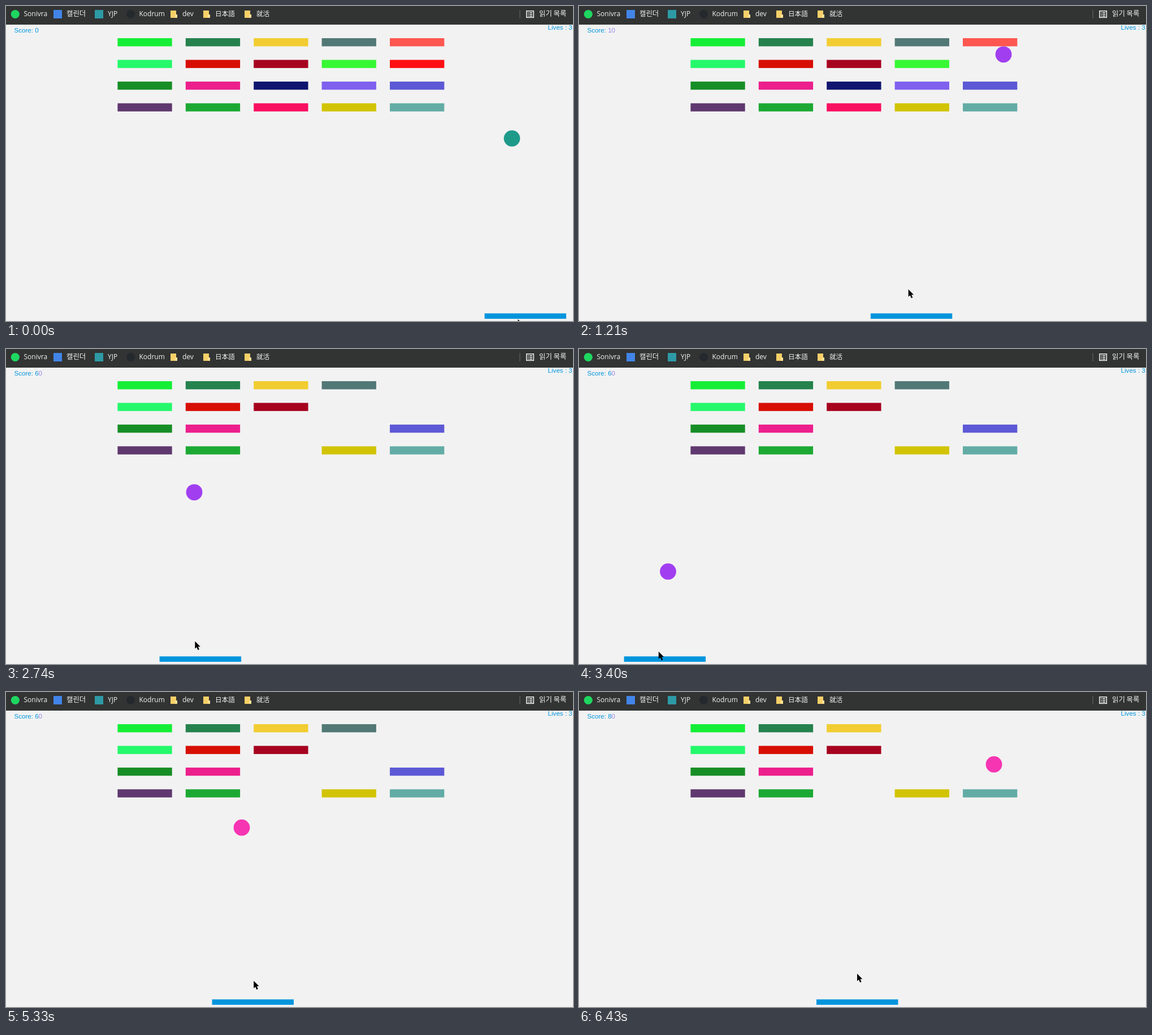
An HTML page with a canvas that plays this animation: 1003 by 558 pixels, repeating every 6.46 s.

```html
<!DOCTYPE html>
<html lang="en">
<head>
<meta charset="utf-8">
<title>Brick breaker</title>
<style>
  html, body { margin: 0; width: 100%; height: 100%; overflow: hidden; background: #f2f2f2; }
  canvas { display: block; }
</style>
</head>
<body>
<canvas id="stage" width="1003" height="558"></canvas>
<script>
const ctx = document.getElementById('stage').getContext('2d');
const LOOP = 6460;
const RADIUS = 14.4;
const BLUE = '#0095dd';
const LILAC = '#9a86e6';
const WHITE = '#f4f4f4';
const ballColors = ['#1e9a8a', '#a13ff0', '#f635b3'];

const bricks = `
  15ee36 25824d f1cd31 527876 fe5750
  25f86b d70e03 a6031f 37f834 ff0f14
  178e25 ec1f8c 10166f 7f60ef 5d59d6
  5f386f 1ca933 f90f60 d2c405 63aca6`.trim().split(/\s+/).map((color, i) => ({
    x: 197.4 + 120.4 * (i % 5),
    y: 57 + 38.45 * Math.floor(i / 5),
    w: 96.3, h: 14.4,
    color: '#' + color,
    hitAt: Infinity
  }));

// pace of the game: [time, simulation step]
const pace = [[0, 0], [1210, 658], [2060, 1134], [3400, 1845], [4400, 2377], [5330, 2936], [6430, 3571]];

// player: [time, paddle x, cursor y]
const player = [
  [0, 847, 555], [650, 582, 510], [1210, 516, 502], [2060, 379, 495],
  [2640, 301, 515], [3400, 80, 536], [3600, 12, 537], [4100, 12, 537],
  [4400, 109, 528], [4610, 212, 522], [5300, 363, 512], [6430, 420, 499]
];

function along(path, t) {
  const i = path.findIndex(p => p[0] > t);
  if (i < 0) return path[path.length - 1].slice(1);
  const a = path[i - 1], b = path[i];
  const k = (t - a[0]) / (b[0] - a[0]);
  return a.slice(1).map((v, j) => v + (b[j + 1] - v) * k);
}

// Play the whole game once; a brick counts as hit when the ball's centre is DEPTH inside.
function playGame(steps) {
  const DEPTH = 4;
  const states = [];
  let x = 894.5, y = 235, dx = 0.5, dy = -0.4, sideHits = 0;
  for (let n = 0; n <= steps; n++) {
    states.push({ x, y, color: ballColors[sideHits] });
    x += dx;
    y += dy;
    if (x >= 987.5 || x <= 14.5) {
      dx = -dx;
      sideHits++;
    }
    if (y <= 48 || y >= 535) dy = -dy;
    const hit = bricks.find(b => b.hitAt > n && x > b.x && x < b.x + b.w &&
      y > b.y + DEPTH && y < b.y + b.h - DEPTH);
    if (hit) {
      hit.hitAt = n + 1;
      dy = -dy;
    }
  }
  return states;
}
const states = playGame(pace[pace.length - 1][1]);

function rect(x, y, w, h, color) {
  ctx.fillStyle = color;
  ctx.fillRect(x, y, w, h);
}

function circle(x, y, r, color) {
  ctx.fillStyle = color;
  ctx.beginPath();
  ctx.arc(x, y, r, 0, 7);
  ctx.fill();
}

// Draws text and returns where it ends.
function text(s, x, y, font, color) {
  ctx.font = font;
  ctx.fillStyle = color;
  ctx.fillText(s, x, y);
  return x + ctx.measureText(s).width;
}

function folder(x) {
  rect(x, 8, 10, 13, '#f7d068');
  rect(x + 8, 15, 4, 6, '#ffe194');
}

function drawBookmarks() {
  const latin = '12px "Open Sans", sans-serif';
  const korean = '12.4px "Noto Sans CJK KR", sans-serif';
  const japanese = '11.6px "Noto Sans CJK JP", sans-serif';
  const label = (s, x, font) => text(s, x, 18.3, font, WHITE);
  rect(0, 0, 1003, 33, '#323333');
  circle(16.3, 14.5, 7.6, '#1ed760');
  rect(84, 7, 15, 15, '#4285e8');
  rect(157, 7, 15, 15, '#2d9aa5');
  circle(220.5, 14.5, 7.6, '#24292e');
  [291, 349, 422].forEach(folder);
  label('Sonivra', 31.5, latin);
  label('캘린더', 107, korean);
  label('YJP', 180, latin);
  label('Kodrum', 235.5, latin);
  label('dev', 312, latin);
  label('日本語', 370, japanese);
  label('就活', 443, japanese);
  label('읽기 목록', 943, korean);
  rect(908.5, 7, 1, 15, '#6a6b6b');
  ctx.strokeStyle = WHITE;
  ctx.lineWidth = 1.5;
  ctx.strokeRect(920.8, 8.8, 12.5, 11.5);
  for (const y of [11, 14, 17]) {
    rect(923, y, 1.6, 1.5, WHITE);
    rect(926, y, 5, 1.5, WHITE);
  }
}

function drawStatus(count) {
  const font = '11.6px "Liberation Sans", Arial, sans-serif';
  let x = text('Score: ', 14.4, 47, font, BLUE);
  if (count) x = text(count, x, 47, font, count === 1 ? LILAC : BLUE);
  text('0', x, 47, font, count ? LILAC : BLUE);
  text('Lives : 3', 958.6, 42.3, font, BLUE);
}

function drawCursor(x, y) {
  const shape = [[0, 0], [0, 13], [3, 10.5], [5.2, 15.5], [7.6, 14.4], [5.4, 9.6], [9.4, 9.4]];
  ctx.fillStyle = '#000';
  ctx.beginPath();
  shape.forEach(([dx, dy]) => ctx.lineTo(x + dx, y + dy));
  ctx.fill();
}

function frame(now) {
  const t = now % LOOP;
  const step = Math.round(along(pace, t)[0]);
  const ball = states[step];
  const [paddleX, cursorY] = along(player, t);
  const standing = bricks.filter(b => b.hitAt > step);

  rect(0, 0, 1003, 558, '#f2f2f2');
  standing.forEach(b => rect(b.x, b.y, b.w, b.h, b.color));
  drawStatus(bricks.length - standing.length);
  rect(paddleX, 544.5, 144.4, 9.6, BLUE);
  circle(ball.x, ball.y, RADIUS, ball.color);
  drawBookmarks();
  // the paddle trails the mouse slightly
  drawCursor(along(player, t + 32)[0] + 72, cursorY);
  requestAnimationFrame(frame);
}
requestAnimationFrame(frame);
</script>
</body>
</html>
```
